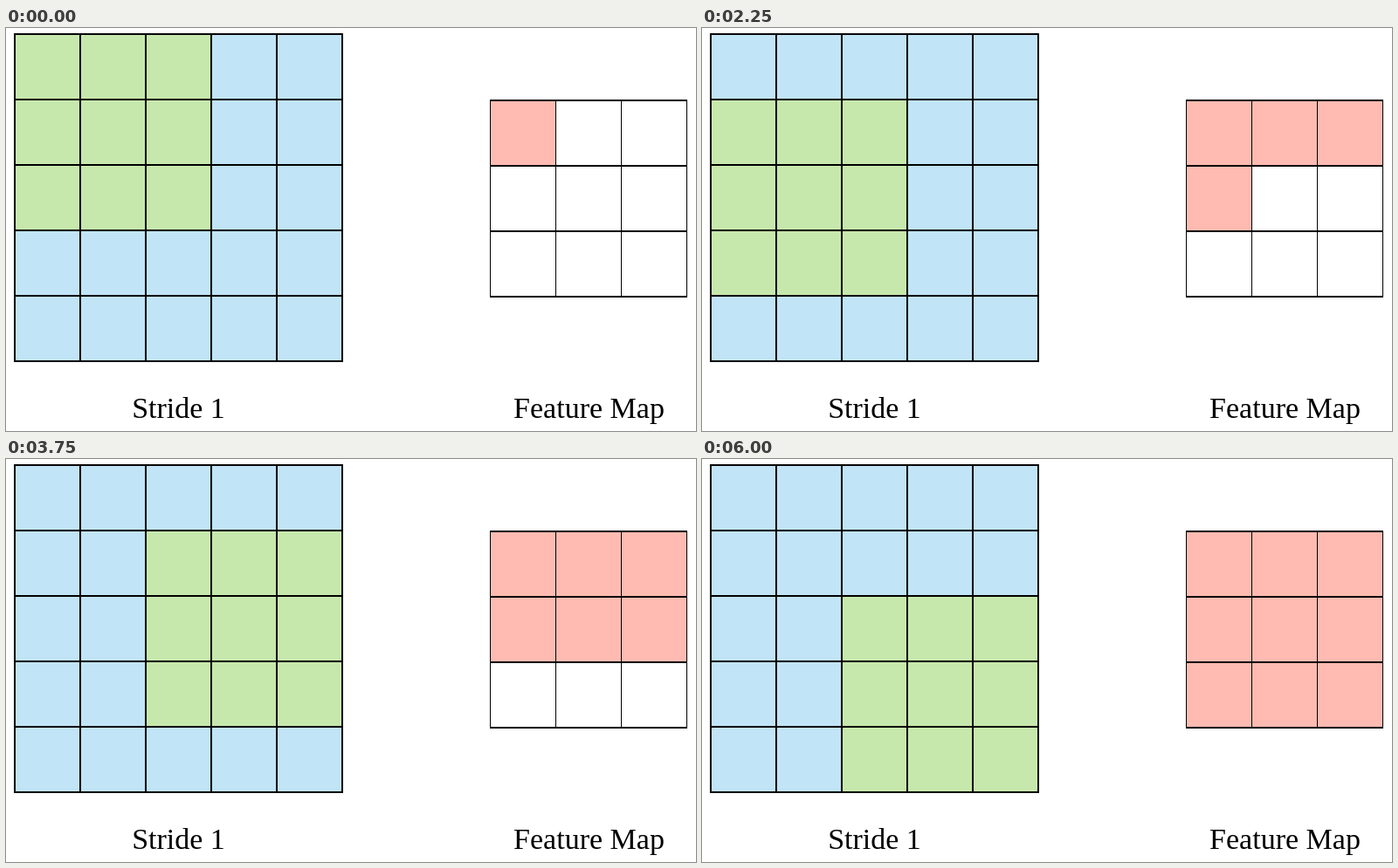
These frames come from a looping animation (790 px wide and 462 px high, 6.75 s). An HTML page:

```html
<!DOCTYPE html>
<html lang="en">
<head>
<meta charset="utf-8">
<title>Convolution with stride 1</title>
<style>
  html, body { margin: 0; width: 100%; height: 100%; overflow: hidden; background: #fff; }
  svg { display: block; width: 790px; height: 462px; }
  text { font: 34px "Liberation Serif", serif; text-anchor: middle; }
</style>
</head>
<body>
<svg viewBox="0 0 790 462">
  <rect x="10" y="7" width="375" height="375" fill="#c1e4f7"/>
  <rect id="kernel" width="225" height="225" fill="#c7e8ac"/>
  <path id="fullRows" fill="#ffbbb1"/>
  <path id="inputLines" stroke="#000" stroke-width="2" stroke-linecap="square"/>
  <path id="mapColumns" stroke="#000"/>
  <path id="mapRows" stroke="#000" stroke-width="2"/>
  <text x="197.5" y="447">Stride 1</text>
  <text x="667.5" y="447">Feature Map</text>
</svg>
<script>
const CELL = 75, STEP_MS = 750, STEPS = 9;
const input = { x: 10, y: 7 };
const featureMap = { x: 554.5, y: 83 };
const byId = id => document.getElementById(id);

const columns = (x, y, n) =>
  Array.from({ length: n + 1 }, (_, i) => `M${x + i * CELL} ${y}v${n * CELL}`).join("");
const rows = (x, y, n) =>
  Array.from({ length: n + 1 }, (_, i) => `M${x} ${y + i * CELL}h${n * CELL}`).join("");

byId("inputLines").setAttribute("d", columns(input.x, input.y, 5) + rows(input.x, input.y, 5));
byId("mapColumns").setAttribute("d", columns(featureMap.x, featureMap.y, 3));
// The horizontal rules reach the outer edges of the thin vertical ones.
byId("mapRows").setAttribute("d", rows(featureMap.x - 0.5, featureMap.y, 3).replaceAll("h225", "h226"));

let shown = -1;
function draw(now) {
  const step = Math.floor(now / STEP_MS) % STEPS;
  if (step !== shown) {
    shown = step;
    const col = step % 3, row = Math.floor(step / 3);
    byId("kernel").setAttribute("x", input.x + col * CELL);
    byId("kernel").setAttribute("y", input.y + row * CELL);
    const { x, y } = featureMap;
    byId("fullRows").setAttribute("d",
      `M${x} ${y}h${3 * CELL}v${row * CELL}H${x}z` +
      `M${x} ${y + row * CELL}h${(col + 1) * CELL}v${CELL}H${x}z`);
  }
  requestAnimationFrame(draw);
}
draw(performance.now());
</script>
</body>
</html>
```
